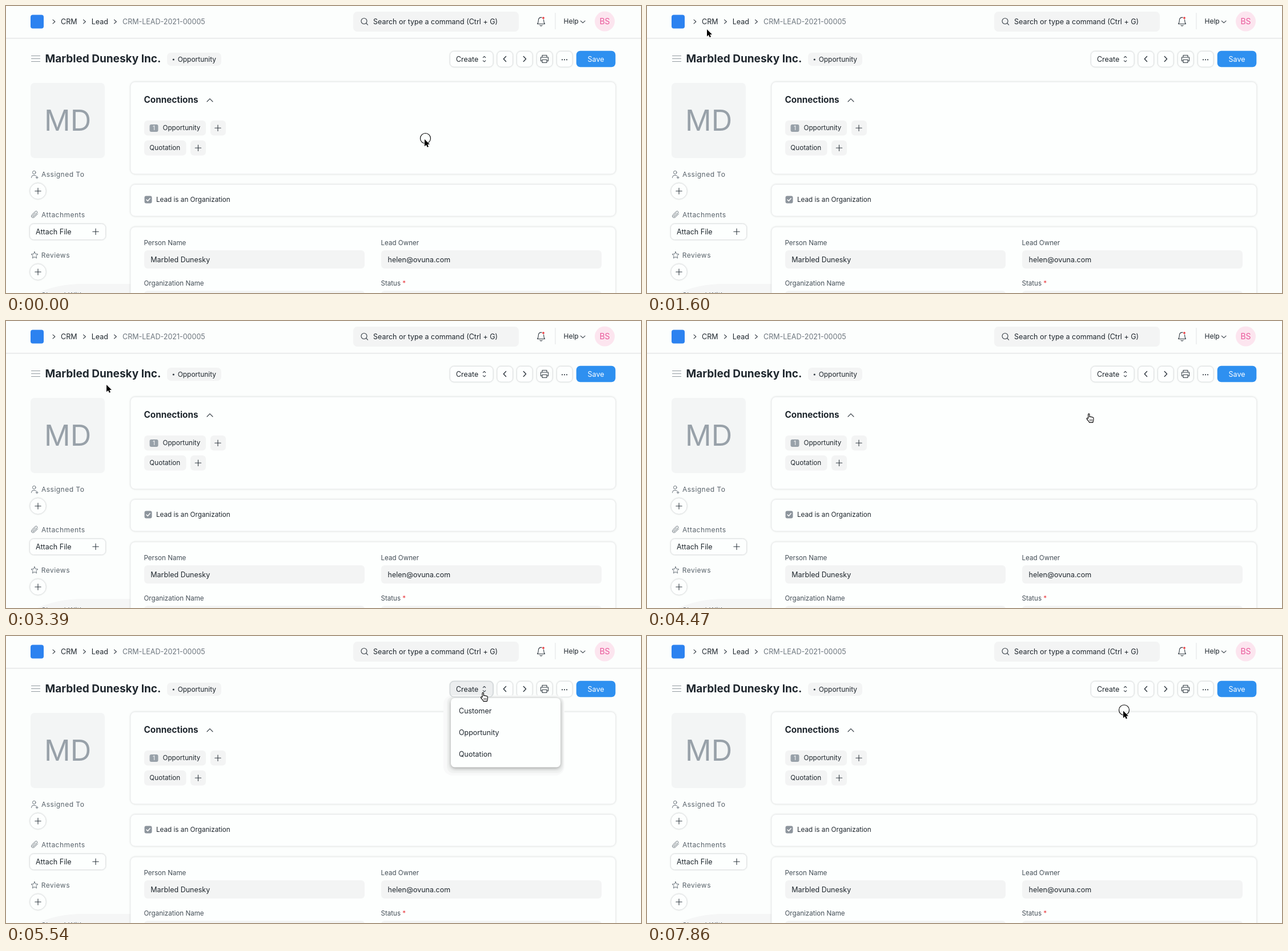
Animation of 1112 by 504 pixels, one loop 8000 ms. Source, as an HTML page:

```html
<!DOCTYPE html>
<html lang="en">
<head>
<meta charset="utf-8">
<title>Lead form</title>
<style>
  html, body { margin: 0; width: 100%; height: 100%; overflow: hidden; background: #fcfefd; }
  svg { display: block; width: 1112px; height: 504px; }
  text { font: 400 12.5px Inter, "Liberation Sans", sans-serif; font-optical-sizing: none; fill: #1f272e; }
  .small { font-size: 11.7px; }
  .label { font-size: 11.6px; fill: #434d56; }
  .side { font-size: 12px; letter-spacing: .48px; fill: #58626a; }
  .title { font-size: 19px; font-weight: 700; }
  .section { font-size: 15.3px; font-weight: 700; }
  .mid { text-anchor: middle; }
  .muted { fill: #6c757d; }
  .grey { fill: #f3f4f4; }
  .line { fill: none; stroke: #333c44; stroke-width: 1.1; stroke-linecap: round; stroke-linejoin: round; }
  .soft { stroke: #69737b; stroke-width: 1; }
  .bars { stroke: #939ba1; }
  .bold { stroke-width: 1.5; }
  .card { fill: #fdfffe; stroke: #eceeee; filter: drop-shadow(0 .5px 1.5px #0002); }
  .btn { fill: #fdfffe; stroke: #dfe2e3; filter: drop-shadow(0 .5px 1px #0002); }
</style>
</head>
<body>
<svg viewBox="0 0 1112 504">
  <defs>
    <path id="plus" class="line" d="M-5.2 0H5.2M0-5.2V5.2"/>
    <path id="right" class="line" d="M-2 -3.4L1.8 0L-2 3.4"/>
  </defs>
  <rect width="1112" height="504" fill="#fcfefd"/>

  <!-- top bar -->
  <rect y="55.8" width="1112" height="1.8" fill="#e8eaea"/>
  <rect x="43" y="15.5" width="23" height="24" rx="4" fill="#2c82f0"/>
  <use href="#right" x="84" y="27.5"/>
  <use href="#right" x="137.5" y="27.5"/>
  <use href="#right" x="191.5" y="27.5"/>
  <text x="96" y="31.8">CRM</text>
  <text x="149.7" y="31.8">Lead</text>
  <text x="204" y="31.8" class="muted">CRM-LEAD-2021-00005</text>
  <rect class="grey" x="608" y="10" width="290" height="35" rx="7"/>
  <g class="line"><circle cx="627" cy="26.5" r="5"/><path d="M630.8 30.3L633.6 33.2"/></g>
  <text x="643" y="31.8" fill="#333c44">Search or type a command (Ctrl + G)</text>
  <path class="line" d="M930.5 31.5H943.5C941.5 29.5 942 27 941.6 24.5C941 18.6 933 18.6 932.4 24.5C932 27 932.5 29.5 930.5 31.5ZM935 33.8Q937 36 939 33.8"/>
  <circle cx="941" cy="21" r="2.3" fill="#e8383d" stroke="#fcfefd"/>
  <rect x="961.5" y="12" width="1" height="29" fill="#dfe2e3"/>
  <text x="976.5" y="31.3" style="font-size:12px">Help</text>
  <path class="line" d="M1006.3 26.2L1010.2 29.7L1014 26.2"/>
  <circle cx="1048.5" cy="27" r="17.5" fill="#fce5ef"/>
  <text class="mid" x="1048.5" y="32" style="font-size:14px;fill:#e9579a">BS</text>

  <!-- title row -->
  <path class="line bars" d="M44.5 87.5H59.5M44.5 92.5H59.5M44.5 97.5H59.5"/>
  <text class="title" x="68.5" y="98.6">Marbled Dunesky Inc.</text>
  <rect class="grey" x="282" y="82" width="95" height="23" rx="7"/>
  <circle cx="293.3" cy="94" r="1.6" fill="#333c44"/>
  <text x="300.7" y="98" style="font-size:11.95px">Opportunity</text>
  <rect id="create" class="btn" x="777.5" y="79.5" width="75.5" height="27.5" rx="7"/>
  <text x="787.9" y="97.6">Create</text>
  <path class="line" d="M835.4 90.6L837.6 88.5L839.8 90.6M835.4 95.8L837.6 97.9L839.8 95.8"/>
  <g id="tools"></g>
  <path class="line bold" d="M875.5 88.5L871.3 93L875.5 97.5M906.3 88.5L910.5 93L906.3 97.5"/>
  <path class="line" d="M939 90V86.5H947V90M939 96.5H936.5V90H949.5V96.5H947M939 94.3H947V99.5H939Z"/>
  <g fill="#333c44"><circle cx="974" cy="94.3" r="1.1"/><circle cx="978" cy="94.3" r="1.1"/><circle cx="982" cy="94.3" r="1.1"/></g>
  <rect x="998.7" y="78.7" width="68.6" height="28.6" rx="7" fill="#2e90f0"/>
  <text class="mid" x="1033" y="97.6" style="fill:#fff">Save</text>

  <!-- sidebar -->
  <rect x="43" y="135" width="130" height="132" rx="7" fill="#f3f5f5"/>
  <text class="mid" x="108.1" y="219.2" style="font-size:50.5px;fill:#98a1a9">MD</text>
  <path class="line soft" d="M44.5 301.5V300.5Q45 297.2 49 297.2Q52 297.2 53 298.8M54.2 299.2V303.2M52.2 301.2H56.2"/>
  <circle class="line soft" cx="49.3" cy="292.3" r="2.8"/>
  <text class="side" x="62" y="300.3">Assigned To</text>
  <circle class="btn" cx="56" cy="325" r="14.2"/><use href="#plus" x="56" y="325"/>
  <path class="line soft" d="M55.5 365L50 370.5C46.5 373.8 42.5 369.8 45.7 366.4L51 361.1C53.5 358.8 56.2 361.5 54 364L48.8 369.2C47.3 370.5 46 369 47.2 367.7L51.8 363.1"/>
  <text class="side" x="62" y="370.5">Attachments</text>
  <rect class="btn" x="41.5" y="382.5" width="133" height="28" rx="7"/>
  <text x="52.1" y="401">Attach File</text><use href="#plus" x="157" y="396.3"/>
  <path id="star" class="line soft"/>
  <text class="side" x="61.7" y="441.8">Reviews</text>
  <circle class="btn" cx="56" cy="467" r="14.2"/><use href="#plus" x="56" y="467"/>
  <path d="M55 504Q90 488 135 488H218V504Z" fill="#f5f6f6"/>
  <text class="side" x="62" y="511.5">Shared With</text>

  <!-- form -->
  <rect class="card" x="218" y="133.3" width="849.5" height="161.7" rx="8"/>
  <rect class="card" x="218" y="313.5" width="849.5" height="55.5" rx="8"/>
  <rect class="card" x="218" y="388" width="849.5" height="150" rx="8"/>
  <text class="section" x="241.5" y="169.8">Connections</text>
  <path class="line" d="M352 168L357 162.8L362 168"/>
  <g class="grey">
    <rect x="242" y="201" width="108" height="26.5" rx="6"/>
    <rect x="358" y="201" width="27" height="26.5" rx="6"/>
    <rect x="242" y="236" width="73.5" height="26.5" rx="6"/>
    <rect x="323" y="236" width="27" height="26.5" rx="6"/>
    <rect x="242" y="429" width="386" height="32" rx="6"/>
    <rect x="657" y="429" width="386" height="32" rx="6"/>
    <rect x="242" y="500" width="386" height="32" rx="6"/>
    <rect x="657" y="500" width="386" height="32" rx="6"/>
  </g>
  <rect x="251.5" y="208" width="15" height="13" rx="3" fill="#98a1a9"/>
  <text class="mid" x="259" y="218" style="font-size:10px;fill:#fff">1</text>
  <text class="small" x="274.5" y="218.3">Opportunity</text><use href="#plus" x="371" y="214.3"/>
  <text class="small" x="251.3" y="253.3">Quotation</text><use href="#plus" x="336.5" y="249.3"/>
  <rect x="242.5" y="333.5" width="13" height="13" rx="3" fill="#8d959d"/>
  <path class="line bold" style="stroke:#fff" d="M246 340.2L248.2 342.4L252.2 337.8"/>
  <text class="small" x="263" y="344.2">Lead is an Organization</text>
  <text class="label" x="241.5" y="419.6">Person Name</text>
  <text x="253.3" y="449.7">Marbled Dunesky</text>
  <text class="label" x="656.5" y="419.6">Lead Owner</text>
  <text x="668.5" y="449.7">helen@ovuna.com</text>
  <text class="label" x="241.5" y="491">Organization Name</text>
  <text class="label" x="656.5" y="491">Status <tspan fill="#e8383d">*</tspan></text>

  <!-- drop-down -->
  <g id="menu">
    <rect x="766" y="104" width="212" height="141" rx="16" fill="#f8f9f9"/>
    <rect x="772" y="106" width="204" height="135" rx="12" fill="#f1f3f2"/>
    <rect x="779" y="109" width="192" height="121.5" rx="7" fill="#fdfffe" style="filter:drop-shadow(0 2px 3px #0005)"/>
    <rect id="hover" x="783" y="113" width="184" height="37" rx="6" fill="#f2f3f3"/>
    <text x="793" y="136.4">Customer</text>
    <text x="793" y="174.2">Opportunity</text>
    <text x="793" y="212">Quotation</text>
  </g>
  <rect id="createOver" x="777.5" y="79.5" width="75.5" height="27.5" rx="7" fill="none" stroke-width="1.6"/>

  <!-- pointer, origin at its tip -->
  <g id="pointer">
    <circle id="ring" cx="1.5" cy="-1.5" r="9" fill="none" stroke="#000" stroke-width="1.1"/>
    <path id="arrow" stroke="#fff" stroke-width="1" stroke-linejoin="round" paint-order="stroke"
      d="M0 0V12.4L2.9 9.8L4.8 14.1L7 13.1L5.1 9H9Z"/>
    <g id="hand" fill="#fff" stroke="#000" stroke-width="1.1" stroke-linejoin="round">
      <path d="M-.9 8.6V1.4C-.9 0 1.4 0 1.4 1.4V6C1.6 5 3.7 5 3.8 6.2C4.1 5.4 6 5.5 6.1 6.8C6.4 6.2 8.4 6.3 8.4 8V11C8.4 13 7.4 13.6 7.4 15.6H1C.6 13.6 -1.6 12.2 -3.3 9.4C-4 8 -2.5 7 -.9 8.6Z"/>
      <path d="M2 10.2V13M4 10.2V13M6 10.2V13" stroke-width=".8"/>
    </g>
  </g>
</svg>
<script>
const LOOP = 8000;
const $ = id => document.getElementById(id);

// time, x, y, look: a = arrow, h = hand, r = click ring
const steps = [
  [0, 733, 234, "ar"], [180, 733, 234, "a"],
  [720, 446, 142, "a"], [890, 216, 67, "a"], [1070, 151, 47, "a"],
  [1250, 118, 41, "a"], [1430, 107, 41, "a"], [1600, 105, 41, "a"],
  [1780, 140, 41, "a"], [1960, 165, 41, "a"],
  [2320, 142, 60, "a"], [2500, 102, 95, "a"], [2680, 88.5, 108, "a"],
  [3040, 118, 111, "a"], [3220, 176, 112, "a"], [3400, 226, 112, "a"], [3570, 244, 112, "a"],
  [4290, 607, 113, "a"], [4470, 773.5, 162.5, "h"],
  [4830, 803, 126, "a"], [5010, 826, 106, "h"], [5180, 835, 99, "h"],
  [5360, 835, 99, "hr"], [5540, 835, 99, "h"],
  [6430, 824, 108, "h"], [6610, 806, 121, "h"], [6790, 834, 130.5, "h"],
  [7860, 834, 131.5, "ar"]
];

const show = (id, on) => $(id).setAttribute("visibility", on ? "visible" : "hidden");

function draw(t) {
  const [, x, y, look] = steps.findLast(s => s[0] <= t);
  $("pointer").setAttribute("transform", `translate(${x} ${y})`);
  show("arrow", look.includes("a"));
  show("hand", look.includes("h"));
  show("ring", look.includes("r"));
  const open = t >= 5540 && t < 7860;
  $("menu").style.display = open ? "" : "none";
  $("hover").style.display = t >= 6610 ? "" : "none";
  const over = t >= 5010 && t < 6610;
  $("create").style.fill = over ? "#eceeef" : "";
  $("createOver").style.stroke = open ? "#d3d8da" : "none";
}

$("tools").innerHTML = [860, 894.5, 929.5, 964.5].map(x =>
  `<rect class="btn" x="${x}" y="79.5" width="27.5" height="27.5" rx="7"/>`).join("");

$("star").setAttribute("d", "M" + Array.from({ length: 10 }, (_, i) => {
  const r = i % 2 ? 2.9 : 6.3, a = (i / 5 - .5) * Math.PI;
  return `${(50 + r * Math.cos(a)).toFixed(2)} ${(437.8 + r * Math.sin(a)).toFixed(2)}`;
}).join("L") + "Z");

const start = performance.now();
function tick() {
  draw((performance.now() - start) % LOOP);
  requestAnimationFrame(tick);
}
tick();
</script>
</body>
</html>
```
